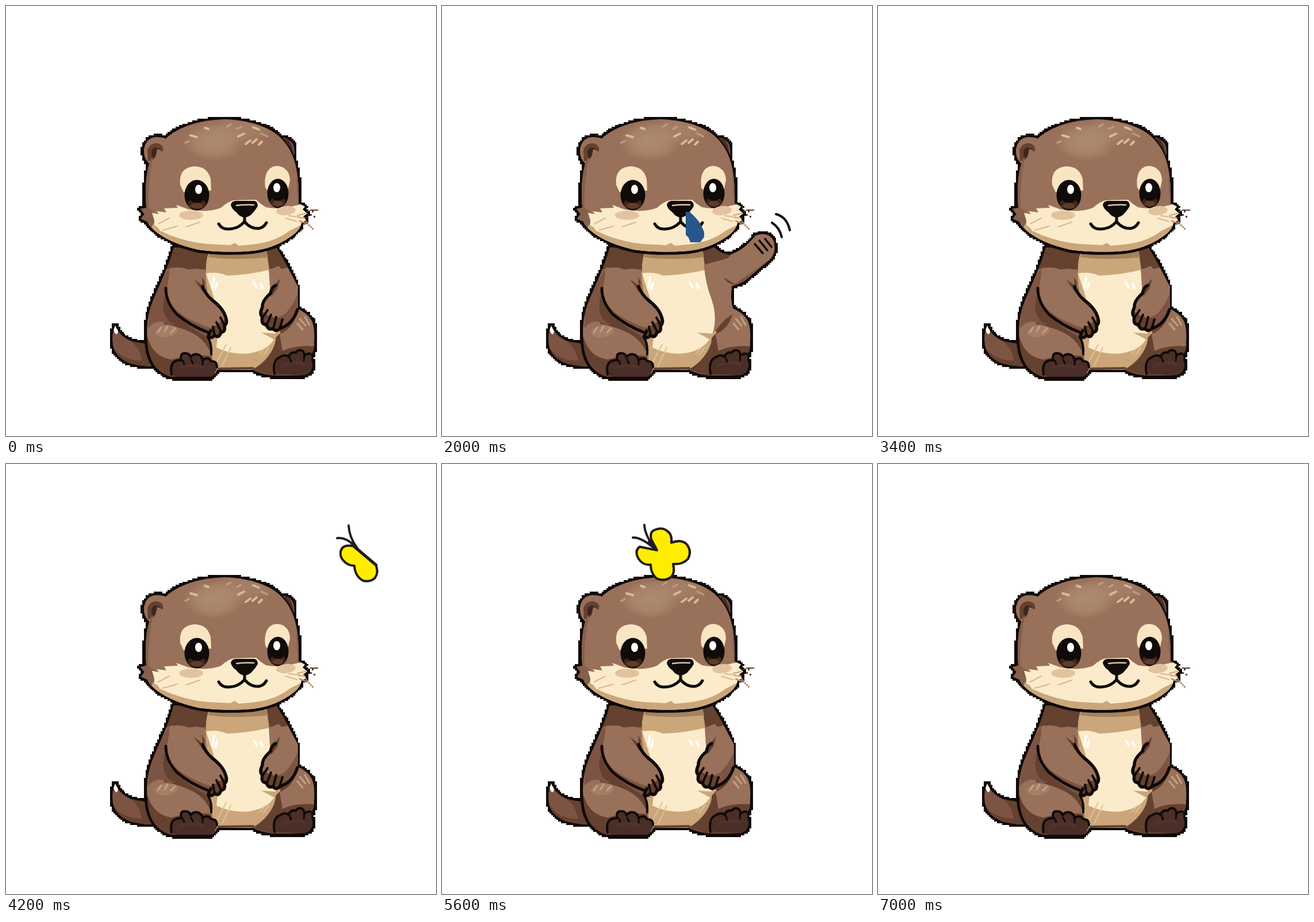
These frames come from a looping animation (748 by 748 pixels, 7200 ms). An HTML page with a canvas:

```html
<!DOCTYPE html>
<html lang="en">
<head>
<meta charset="utf-8">
<title>Otter</title>
<style>
html, body { margin: 0; width: 100%; height: 100%; overflow: hidden; background: #fff; }
canvas { display: block; width: 100vw; height: 100vh; }
</style>
</head>
<body>
<canvas id="stage" width="748" height="748"></canvas>
<script>
const SIZE = 748, GRID = 256, LOOP = 7200, STEP = 200;
const INK = '#100a09', FUR = '#99705a', SHADE = '#7d5443', DARK = '#65412f';
const DEEP = '#4a2e27', CREAM = '#fbebca', PATCH = '#fae5c2', TAN = '#caa67a', LIGHT = '#c4a082';
const stage = document.getElementById('stage').getContext('2d');
let g;

const fill = (d, color) => { g.fillStyle = color; g.fill(new Path2D(d)); };
function line(d, color = INK, width = 4.5) {
  g.strokeStyle = color;
  g.lineWidth = width;
  g.stroke(new Path2D(d));
}
function oval(x, y, rx, ry, color, turn = 0) {
  g.fillStyle = color;
  g.beginPath();
  g.ellipse(x, y, rx, ry, turn, 0, Math.PI * 2);
  g.fill();
}
function inside(d, paint) {
  g.save();
  g.clip(new Path2D(d));
  paint();
  g.restore();
}
// The ink shows only outside the filled shape.
function inked(d, color) {
  line(d, INK, 10.5);
  fill(d, color);
}
function glow(x, y, rx, ry, rgb, alpha) {
  const grad = g.createRadialGradient(0, 0, 0, 0, 0, 1);
  grad.addColorStop(0, `rgba(${rgb},${alpha})`);
  grad.addColorStop(.6, `rgba(${rgb},${alpha * .7})`);
  grad.addColorStop(1, `rgba(${rgb},0)`);
  g.save();
  g.translate(x, y);
  g.scale(rx, ry);
  g.fillStyle = grad;
  g.fillRect(-1, -1, 2, 2);
  g.restore();
}
function sheet(size) {
  const c = document.createElement('canvas');
  c.width = c.height = size;
  return c;
}

function drawTail() {
  const tail = 'M190 556 Q198 575 218 583 Q235 588 262 588 L270 627 Q232 628 212 620 Q190 610 186 590 Q183 570 190 556Z';
  inked(tail, SHADE);
  inside(tail, () => {
    fill('M184 590 Q198 612 222 616 Q245 618 270 616 L270 640 L200 640Z', DARK);
    fill('M212 580 Q236 592 238 630 L275 630 L275 580Z', DARK);
    oval(191, 560, 4, 11, '#fff', -.1);
  });
}

const BASE = 'M292 420 C283 455 264 490 253 520 C244 545 244 570 247 592 C250 620 265 640 290 645 L356 645 ' +
  'Q364 642 367 633 L430 633 Q448 642 470 643 L518 642 Q533 639 533 622 Q527 612 535 598 C537 575 537 560 532 548 Q525 534 506 526';
const DOWN = BASE + ' L506 489 Q494 458 470 420Z';
const UP = BASE + ' Q501 512 504 487 Q523 483 535 471 L570 441 Q583 428 576 407 Q565 391 545 400 Q525 425 500 433 Q484 431 474 420Z';

function drawBelly(up) {
  const side = up ? 'Q465 500 472 520 Q479 550 470 572' : 'Q464 500 462 530 Q472 555 468 577';
  fill('M352 425 Q346 445 348 480 L356 540 L356 640 L435 640 Q466 610 474 572 Q470 500 456 425Z', TAN);
  fill(`M348 465 Q370 462 384 469 Q420 468 458 459 ${side} Q455 603 412 605 Q384 604 366 594 L372 540Z`, CREAM);
  line('M362 473 L359 490 M367 482 L364 493 M431 481 L436 489 M443 483 L446 491', '#fff', 4);
  line('M383 589 L366 621 M391 594 L376 626 M442 605 L449 596 M448 607 L457 594', '#dfc194', 2);
}

function drawLegs() {
  fill('M248 555 C270 535 340 545 357 590 L362 640 L290 650 Q242 640 248 555Z', FUR);
  fill('M246 575 Q255 610 288 615 Q325 605 356 609 L366 650 L270 650 Q245 630 246 575Z', DARK);
  fill('M275 545 Q335 542 356 592 L357 606 Q346 578 320 567 Q302 558 275 553Z', DARK);
  oval(279, 566, 20, 10, '#a67e67', -.15);
  line('M264 568 L270 559 M276 566 L281 557 M287 568 L294 561', LIGHT, 3);
  line('M286 549 Q340 551 354 582 Q358 592 357 606', INK, 4);

  fill('M470 575 Q492 542 510 532 Q548 540 538 602 L528 640 L430 636 Q466 620 470 575Z', FUR);
  fill('M476 571 Q500 560 505 536 L493 545 Q470 568 470 580 Q462 614 428 633 L470 645 L482 607Z', DARK);
  fill('M466 610 Q490 588 538 592 L536 645 L455 645Z', DARK);
  line('M511 544 L521 556 M520 541 L528 555 M507 552 L516 563', LIGHT, 3);
  line('M472 573 Q470 590 467 607', DARK, 4);

  const leftFoot = 'M288 641 Q283 615 305 616 Q302 604 311 604 Q320 604 321 611 Q327 603 336 607 Q341 610 342 616 Q351 609 357 618 Q370 618 367 631 L360 645 L300 647Z';
  const rightFoot = 'M467 640 Q463 616 476 611 Q486 605 491 610 Q496 601 504 603 Q507 598 514 599 Q519 601 519 608 Q529 601 533 608 L531 615 Q538 620 533 629 L528 642Z';
  for (const foot of [leftFoot, rightFoot]) fill(foot, DEEP);
  line('M288 641 Q283 615 305 616 Q302 604 311 604 Q320 604 321 611 Q327 603 336 607 Q341 610 342 616 Q351 609 357 618 Q367 617 367 628', INK, 4);
  line('M467 640 Q463 616 476 611 Q486 605 491 610 Q496 601 504 603 Q507 598 514 599 Q519 601 519 608 Q529 601 533 608', INK, 4);
  line('M302 630 Q318 621 342 628 M480 627 Q498 616 518 623', '#52342b', 5);
  line('M308 617 L310 623 M322 615 L325 622 M342 616 L342 624 M493 611 L496 619 M519 608 L518 617', INK, 3);
  line('M370 631 L430 630', DARK, 4);
}

function drawLeftArm() {
  fill('M248 540 Q256 505 283 455 L286 500 Q276 530 300 550 L286 556 Q265 540 247 560Z', SHADE);
  fill('M276 505 Q282 530 305 545 L340 568 L352 585 Q310 555 286 551 Q268 535 276 505Z', DARK);
  fill('M286 455 Q318 460 347 458 L343 490 Q352 505 375 526 Q386 540 382 552 L375 568 L358 577 Q320 560 297 538 Q280 520 280 492Z', FUR);
  fill('M280 495 Q282 520 305 536 Q335 555 357 560 L381 546 L377 570 L357 579 Q320 562 296 538Q279 520 280 495Z', SHADE);
  fill('M354 562 L381 546 L380 558 L374 571 L357 579Z', DARK);
  fill('M327 475 L342 486 L341 471 L346 481 L343 498Z', DARK);
  line('M278 491 Q278 516 297 536 Q320 556 352 568', INK, 5);
  line('M342 488 Q346 500 358 511 Q378 526 382 541 Q386 552 380 556 Q382 568 374 567 Q371 579 363 573 Q356 580 352 574 L356 565', INK, 5.5);
  line('M380 555 L373 542 M374 566 L366 550 M363 573 L360 558', INK, 4);
}

function drawRestingArm() {
  fill('M457 457 Q475 460 490 455 L508 488 L507 530 Q500 553 476 562 L450 557 L443 532 Q446 515 460 503Z', FUR);
  fill('M508 500 L508 532 Q497 555 474 563 L448 554 L446 535 Q470 548 486 535 Q500 520 508 500Z', SHADE);
  fill('M444 530 Q460 545 484 543 L478 560 L466 564 L448 556Z', DARK);
  fill('M463 490 L477 474 L472 492 L461 506Z', DARK);
  line('M469 486 Q462 489 460 500 Q445 513 446 524 Q440 536 446 541 Q443 555 453 554 Q456 565 464 561 Q470 568 476 561 Q499 554 507 528', INK, 5.5);
  line('M447 541 L455 529 M454 554 L461 537 M465 561 L470 541 M476 561 L481 545', INK, 4);
}

function drawRaisedArm() {
  fill('M456 450 L500 438 Q525 425 546 398 L582 400 L580 440 L508 487 L507 530 Q486 548 471 570 Q479 542 470 512 Q460 490 456 455Z', FUR);
  fill('M506 486 L570 441 L580 425 L584 448 L510 492Z', SHADE);
  fill('M506 484 Q496 483 490 472 L512 485Z', DARK);
  line('M544 414 L558 430 M552 408 L566 425 M562 405 L573 419', INK, 3.5);
}

function drawBody(up) {
  const body = up ? UP : DOWN;
  inked(body, FUR);
  inside(body, () => {
    drawBelly(up);
    drawLegs();
    fill('M444 568 L470 570 L474 563 L478 568 L466 580Z', TAN);
    fill('M275 415 L358 415 Q346 440 348 462 Q335 454 318 459 Q300 450 275 460Z', DARK);
    if (up) {
      fill('M452 415 L474 420 Q490 430 504 432 Q490 445 477 457 L458 459Z', DARK);
    } else {
      fill('M452 415 L480 415 L498 455 L482 460 L474 452 L458 459Z', DARK);
    }
    fill('M354 428 L454 428 L456 437 Q400 443 352 437Z', '#a5825d');
  });
  drawLeftArm();
  if (up) inside(UP, drawRaisedArm);
  else drawRestingArm();
}

function drawEye(x, y, rx, ry, shine) {
  oval(x, y, rx, ry, INK);
  oval(x, y + ry * .57, rx * .72, ry * .36, '#3f261a');
  oval(x, y + ry * .7, rx * .5, ry * .18, '#603d26');
  oval(x, y - 2, rx * .78, ry * .58, INK);
  oval(x + shine, y - 10, 6, 8, '#fff');
}

function drawHead() {
  const leftEar = 'M249 274 Q239 265 240 250 Q243 229 262 228 Q276 228 284 234 L275 280Z';
  const rightEar = 'M478 230 Q488 228 496 236 Q503 242 501 262 L490 270Z';
  const head = 'M380 197 Q435 199 468 221 Q494 240 503 274 Q510 300 509 343 L520 349 L516 354 L524 361 L517 366 L522 373 L514 377 ' +
    'Q512 390 494 402 Q465 422 428 426 Q378 430 335 424 Q290 414 264 395 Q249 384 246 375 L235 370 L241 362 L234 353 L244 351 ' +
    'Q241 310 247 283 Q253 252 283 226 Q318 199 380 197Z';
  for (const d of [leftEar, rightEar, head]) line(d, INK, 10.5);
  fill(rightEar, SHADE);
  line('M487 232 Q497 240 498 262', DEEP, 5);
  line(head, INK, 5);
  fill(leftEar, FUR);
  fill(head, FUR);
  fill('M246 250 Q252 237 264 239 Q275 242 273 252 L262 258 Q257 270 247 270Z', DARK);
  fill('M253 253 Q257 242 268 249 Q271 255 263 255 Q260 264 254 267Z', '#3e251f');
  fill('M263 249 Q270 250 272 256 L259 268Z', FUR);

  inside(head, () => {
    fill('M238 280 L256 262 Q246 310 248 352 L262 361 L256 385 L230 380Z', '#85604c');
    line('M508 278 Q507 320 512 350', '#87604c', 5);
    glow(362, 236, 54, 34, '176,143,116', .85);
    glow(410, 216, 58, 24, '173,138,111', .6);
    line('M321 225 L332 228 M346 212 L352 214 M404 227 L414 222 M417 240 L425 234 M429 238 L436 232 M440 241 L445 236 M430 211 L440 215', '#d8ba98', 4);
    line('M384 210 L391 206 M402 214 L409 210 M312 238 L318 235 M444 222 L455 227', '#bd9a7d', 3.5);

    fill('M240 357 L266 362 L262 357 L279 359 L275 352 L299 351 L296 346 L318 354 Q352 360 374 351 Q386 340 396 338 L435 337 Q442 344 452 350 Q475 355 504 347 L526 343 L530 380 L500 435 L280 430 L257 386 L258 374 L252 368Z', CREAM);
    fill('M250 377 L264 385 L268 391 L286 399 Q322 412 350 414 L390 416 L398 412 L405 417 L426 415 Q468 411 493 391 L515 380 L518 400 L450 438 L300 435 L240 390Z', TAN);
    fill('M236 350 L252 353 L258 373 L253 386 L230 373Z', '#85604c');
    line('M265 379 L284 369 M273 390 L298 383 M314 384 L337 376 M486 369 L506 375 M492 365 L511 367', '#d9b98f', 2);
  });

  fill('M303 311 Q300 282 326 279 Q350 278 356 301 L357 321 L309 324Z', PATCH);
  fill('M451 316 Q447 281 471 278 Q493 280 494 303 L491 318 L457 323Z', PATCH);
  drawEye(332, 329, 21.5, 26.5, 3);
  drawEye(473, 326, 18.5, 25.5, -2);
  oval(322, 364, 21, 8, '#e2c3a0');
  oval(487, 356, 17, 8, '#e2c3a0', -.1);

  fill('M391 346 Q392 340 399 339 L432 339 Q438 340 438 348 Q434 355 430 359 Q424 367 415 368 Q405 366 401 359 Q393 354 391 346Z', INK);
  line('M401 347 Q415 345 431 346', '#d9c6ac', 2.5);
  line('M415 366 L415 375 M370 379 Q375 388 386 388 Q404 388 415 375 Q424 387 439 387 Q448 386 453 377', INK, 5);

  line('M524 357 L543 354 M529 353 L534 358 M530 363 L538 368', '#5b4032', 2);
  line('M511 374 L521 378 M522 375 L533 387', '#b58b70', 2.5);
  line('M507 364 L521 361 M509 368 L520 369', TAN, 2);
}

// Cuts the picture's outer edge to a coarse grid, for a stepped outline.
function stepEdge(picture) {
  const mask = sheet(GRID), m = mask.getContext('2d');
  m.drawImage(picture, 0, 0, GRID, GRID);
  const cells = m.getImageData(0, 0, GRID, GRID);
  for (let i = 3; i < cells.data.length; i += 4) cells.data[i] = cells.data[i] > 100 ? 255 : 0;
  m.putImageData(cells, 0, 0);
  const under = picture.getContext('2d');
  under.imageSmoothingEnabled = false;
  under.globalCompositeOperation = 'destination-in';
  under.drawImage(mask, 0, 0, SIZE, SIZE);
  under.globalCompositeOperation = 'destination-over';
  under.drawImage(mask, 0, 0, SIZE, SIZE);
}

function portrait(up) {
  const picture = sheet(SIZE);
  g = picture.getContext('2d');
  g.lineCap = g.lineJoin = 'round';
  drawTail();
  drawBody(up);
  drawHead();
  stepEdge(picture);
  return picture;
}

function drawDrip(k) {
  g.save();
  g.translate(424, 358);
  g.scale(Math.min(1, .5 + k * .1), .35 + .13 * k);
  fill('M0 0 L7 0 L16 9 L23 17 L28 26 L32 35 L32 44 L25 53 L8 53 L5 45 L0 40Z', '#28568c');
  g.restore();
}

function drawButterfly(x, y, open) {
  g.save();
  g.translate(x, y);
  const wings = open
    ? 'M22 44 L12 25 Q9 13 17 9 Q30 3 39 10 Q49 16 47 31 Q65 24 74 34 Q83 46 76 59 Q67 69 50 68 Q54 84 46 91 Q34 99 21 93 Q11 84 11 69 Q-2 71 -10 59 Q-18 45 -8 38Z'
    : 'M-14 46 Q-12 35 0 35 Q12 34 18 43 L47 68 Q53 80 46 91 Q38 99 25 96 Q11 88 10 70 Q-2 70 -10 60 Q-15 54 -14 46Z';
  fill(wings, '#ffed00');
  line(wings, '#211b20', 4);
  if (!open) line('M9 36 L48 69', '#211b20', 5);
  line(open ? 'M0 0 Q1 19 20 43 M-20 22 Q-5 21 20 43 M8 29 L18 41' : 'M0 0 Q1 20 14 38 M-20 22 Q-3 20 12 38', '#211b20', 4);
  g.restore();
}

// Flight waypoints: [time, x, y].
const ARRIVE = [[3800, 673, 84], [4200, 596, 107], [4800, 448, 123], [5000, 406, 152]];
const LEAVE = [[5400, 406, 152], [5800, 298, 60], [6200, 190, 87], [6600, 33, 175], [6800, -22, 212]];
function along(path, t) {
  let i = 0;
  while (i < path.length - 2 && t > path[i + 1][0]) i++;
  const [a, b] = [path[i], path[i + 1]];
  const u = Math.min(1, Math.max(0, (t - a[0]) / (b[0] - a[0])));
  return [a[1] + (b[1] - a[1]) * u, a[2] + (b[2] - a[2]) * u];
}

const resting = portrait(false), waving = portrait(true);
g = stage;
g.lineCap = g.lineJoin = 'round';

function draw(now) {
  const t = Math.floor(now % LOOP / STEP) * STEP;
  const wave = t >= 1000 && t < 3400;
  g.fillStyle = '#fff';
  g.fillRect(0, 0, SIZE, SIZE);
  g.drawImage(wave ? waving : resting, 0, 0);
  if (wave) {
    line('M574 377 Q587 385 591 402 M581 362 Q600 367 605 390', INK, 4);
    if (t >= 1200) drawDrip(Math.min(8, (t - 1000) / STEP));
  }
  if (t >= 3800 && t < 7000) {
    const sitting = t >= 5000 && t < 5600;
    const [x, y] = along(t < 5400 ? ARRIVE : LEAVE, t);
    drawButterfly(x, y, sitting || (t - 3800) / STEP % 2 === 1);
  }
}

const start = performance.now();
function tick() {
  draw(performance.now() - start);
  requestAnimationFrame(tick);
}
tick();
</script>
</body>
</html>
```
